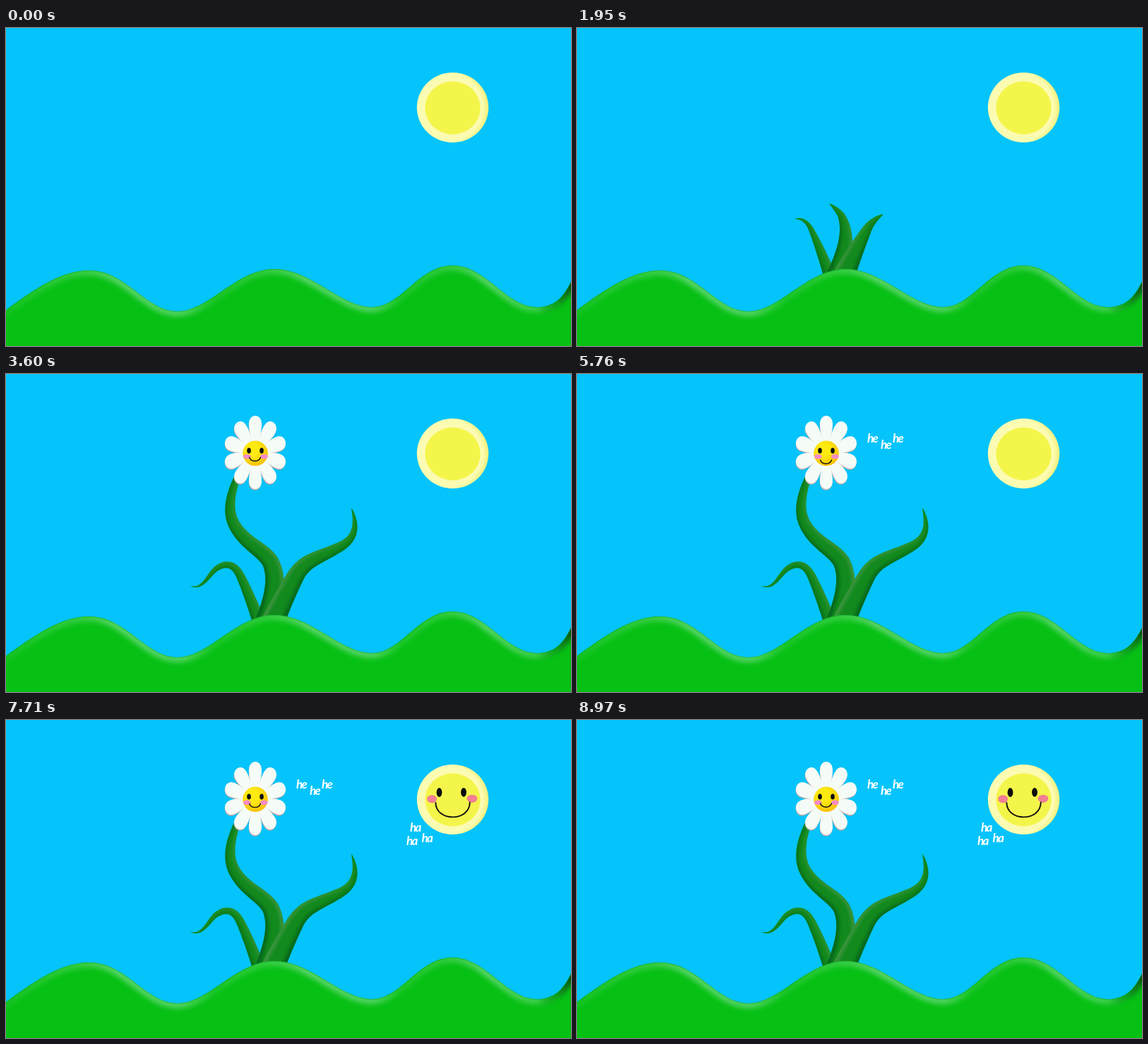
An HTML page for the animation above (9 s loop, 800 by 450 pixels).

```html
<!DOCTYPE html>
<html lang="en">
<head>
<meta charset="utf-8">
<title>Laughing flower and sun</title>
<style>
  html, body { margin: 0; width: 100%; height: 100%; overflow: hidden; background: #04c4fb; }
  svg { display: block; width: 800px; height: 450px; }
  text { font: italic 700 17px Lato, "Open Sans", sans-serif; letter-spacing: -1.6px; fill: #fff; }
  .mouth { fill: none; stroke: #111; stroke-linecap: round; }
</style>
</head>
<body>
<svg viewBox="0 0 800 450">
  <defs>
    <path id="ridge" d="M-20 413 C28 380 70 343 118 343 C170 343 198 401 243 401 C287 401 326 341 380 341 C432 341 474 395 518 395 C560 395 584 336 632 336 C680 336 708 395 752 395 C777 395 790 380 800 359 L820 318"/>
    <clipPath id="land"><path d="M-20 413 C28 380 70 343 118 343 C170 343 198 401 243 401 C287 401 326 341 380 341 C432 341 474 395 518 395 C560 395 584 336 632 336 C680 336 708 395 752 395 C777 395 790 380 800 359 L820 318 V470 H-20 Z"/></clipPath>
    <linearGradient id="rim" gradientUnits="userSpaceOnUse" x1="0" x2="800" y1="0" y2="0">
      <stop offset="0" stop-color="#46d254" stop-opacity=".2"/>
      <stop offset=".13" stop-color="#46d254" stop-opacity=".7"/>
      <stop offset=".2" stop-color="#52d462"/>
      <stop offset=".31" stop-color="#4cd25c"/>
      <stop offset=".37" stop-color="#46d254" stop-opacity=".3"/>
      <stop offset=".46" stop-color="#46d254" stop-opacity=".65"/>
      <stop offset=".53" stop-color="#52d462"/>
      <stop offset=".65" stop-color="#4cd25c"/>
      <stop offset=".7" stop-color="#46d254" stop-opacity=".3"/>
      <stop offset=".78" stop-color="#46d254" stop-opacity=".65"/>
      <stop offset=".85" stop-color="#52d462"/>
      <stop offset=".94" stop-color="#46d254" stop-opacity=".8"/>
      <stop offset=".97" stop-color="#1c8a2a" stop-opacity=".5"/>
      <stop offset="1" stop-color="#054d10"/>
    </linearGradient>
    <radialGradient id="ring" cx=".43" cy=".5" r=".58">
      <stop offset=".84" stop-color="#fcfbb2"/>
      <stop offset="1" stop-color="#f1ee70"/>
    </radialGradient>
    <radialGradient id="disc" cx=".4" cy=".35" r=".7">
      <stop offset=".35" stop-color="#fdea10"/>
      <stop offset="1" stop-color="#f7bd08"/>
    </radialGradient>
    <filter id="soft" x="-20%" y="-20%" width="140%" height="140%"><feGaussianBlur stdDeviation="3.2"/></filter>
    <filter id="fine" x="-50%" y="-50%" width="200%" height="200%"><feGaussianBlur stdDeviation="2.4"/></filter>
    <g id="petals"></g>
  </defs>

  <rect width="800" height="450" fill="#04c4fb"/>

  <ellipse cx="632.5" cy="112.5" rx="50.7" ry="49.5" fill="url(#ring)"/>
  <ellipse cx="632.5" cy="113" rx="39.2" ry="37.4" fill="#f4f54a"/>
  <g id="sunFace">
    <ellipse cx="613.5" cy="102.5" rx="3.9" ry="6.4" fill="#0b0b0b"/>
    <ellipse cx="648" cy="102.3" rx="3.9" ry="6.4" fill="#0b0b0b"/>
    <ellipse cx="603" cy="111.8" rx="7" ry="5.6" fill="#f27f93"/>
    <ellipse cx="660" cy="111.3" rx="7.4" ry="5.6" fill="#f27f93"/>
    <path id="sunMouth" class="mouth" stroke-width="1.9" d="M608.3 117 C608.8 144.3 656.2 144.3 656.8 116.5"/>
  </g>

  <g id="plant"></g>

  <g clip-path="url(#land)">
    <rect y="300" width="800" height="150" fill="#07c014"/>
    <use href="#ridge" fill="none" stroke="url(#rim)" stroke-width="15" filter="url(#soft)"/>
    <use href="#ridge" fill="none" stroke="#0a8f2c" stroke-opacity=".35" stroke-width="2"/>
  </g>

  <g id="flower">
    <use href="#petals" x="-.4" y="1.4" fill="#c3a9a9"/>
    <use href="#petals" fill="#f5fbf6"/>
    <circle cy="1.3" r="17.8" fill="url(#disc)"/>
  </g>
  <g id="flowerFace">
    <ellipse cx="344" cy="108.6" rx="2.8" ry="4" fill="#0b0b0b"/>
    <ellipse cx="362" cy="108.6" rx="2.8" ry="4" fill="#0b0b0b"/>
    <ellipse cx="341.3" cy="116.8" rx="5.4" ry="3.4" fill="#f68bc6"/>
    <ellipse cx="365.3" cy="116.8" rx="5.4" ry="3.4" fill="#f68bc6"/>
    <path id="flowerMouth" class="mouth" stroke-width="1.4" d="M344.6 118 C347 125 358 125 360.4 118"/>
  </g>

  <g id="he">
    <text x="411" y="97">he</text>
    <text x="430" y="106">he</text>
    <text x="447" y="96.5">he</text>
  </g>
  <g id="ha">
    <text x="572" y="157.5">ha</text>
    <text x="567" y="176.5">ha</text>
    <text x="588.5" y="173">ha</text>
  </g>
</svg>

<script>
const LOOP = 9000, STEP = 30;
const GROW = 1230, BLOOM = 3060, BLOOM_TIME = 270, SMILE = 3600;
const GIGGLE = 4830, SUN_SMILE = 6060, SUN_LAUGH = 7290;
const SPEED = 0.147;   // px of stem per ms
const TAPER = 0.72;

const $ = id => document.getElementById(id);

function make(tag, attrs, parent) {
  const el = document.createElementNS("http://www.w3.org/2000/svg", tag);
  for (const key in attrs) el.setAttribute(key, attrs[key]);
  if (parent) parent.append(el);
  return el;
}

for (let i = 0; i < 10; i++) {
  make("path", {
    d: "M-3.5 -8 C-7 -22 -10.8 -31 -10.4 -41 C-10 -48.5 -5 -52 0 -52 C5 -52 10 -48.5 10.4 -41 C10.8 -31 7 -22 3.5 -8 Z",
    transform: `scale(.86 1) rotate(${i * 36})`
  }, $("petals"));
}

// lit: side of the stem that catches the light (1 = right of its direction)
const stems = [
  { d: "M360 356 C351 330 339 300 331 284 C322 267 309 267 297 276 C285 286 279 306 261 300", width: 18.5, start: 0, lit: 1 },
  { d: "M366 358 C378 325 387 291 374 265 C362 247 336 239 322 211 C310 186 322 148 350 104", width: 32, start: 14, lit: 1 },
  { d: "M373 362 C384 335 399 306 410 286 C423 263 446 259 466 248 C490 238 501 222 489 189", width: 34, start: 12, lit: -1 }
].map((stem, i) => {
  const line = make("path", { d: stem.d });
  const clip = make("clipPath", { id: "stem" + i }, $("plant"));
  const outline = make("path", {}, clip);
  const body = make("path", { fill: "#128a1d" }, $("plant"));
  const shade = make("g", { "clip-path": `url(#stem${i})` }, $("plant"));
  const dark = make("path", { fill: "#04581a", "fill-opacity": .75, filter: "url(#fine)" }, shade);
  const light = make("path", { fill: "#5a9c58", "fill-opacity": .7, filter: "url(#fine)" }, shade);
  return { ...stem, line, length: line.getTotalLength(), outline, body, dark, light };
});

// Outline between two offsets, measured in half widths from the centre line
function ribbon(spine, from, to) {
  const edge = k => spine.map(p =>
    (p.x + p.nx * p.half * k).toFixed(2) + " " + (p.y + p.ny * p.half * k).toFixed(2));
  return "M" + edge(from).concat(edge(to).reverse()).join("L") + "Z";
}

function drawStem(stem, time) {
  const grown = time < GROW ? 0 : Math.min(stem.length, stem.start + SPEED * (time - GROW));
  if (grown === stem.grown) return;
  stem.grown = grown;
  const parts = [stem.outline, stem.body, stem.dark, stem.light];
  if (grown < 2) {
    parts.forEach(p => p.setAttribute("d", ""));
    return;
  }
  const spine = [], count = 48;
  for (let i = 0; i <= count; i++) {
    const u = i / count, s = grown * u;
    const p = stem.line.getPointAtLength(s);
    const a = stem.line.getPointAtLength(Math.max(0, s - 1));
    const b = stem.line.getPointAtLength(Math.min(stem.length, s + 1));
    const len = Math.hypot(b.x - a.x, b.y - a.y) || 1;
    spine.push({
      x: p.x, y: p.y,
      nx: (a.y - b.y) / len, ny: (b.x - a.x) / len,
      half: stem.width / 2 * Math.pow(1 - u, TAPER)
    });
  }
  const full = ribbon(spine, -1, 1), lit = stem.lit;
  const shapes = [full, full, ribbon(spine, -lit * 1.2, -lit * 0.65), ribbon(spine, lit * 0.7, lit * 1.1)];
  parts.forEach((p, i) => p.setAttribute("d", shapes[i]));
}

const show = (id, on) => { $(id).style.display = on ? "" : "none"; };

function bounce(id, since, period, height) {
  const y = since < 0 ? 0 : height * (1 - Math.cos(2 * Math.PI * since / period)) / 2;
  $(id).setAttribute("transform", `translate(0 ${y.toFixed(2)})`);
}

function draw(time) {
  stems.forEach(stem => drawStem(stem, time));

  const bloom = Math.max(0, Math.min(1, (time - BLOOM) / BLOOM_TIME));
  show("flower", bloom > 0);
  $("flower").setAttribute("transform", `translate(353 111) scale(${bloom})`);

  show("flowerFace", time >= SMILE);
  show("he", time >= GIGGLE);
  show("sunFace", time >= SUN_SMILE);
  show("ha", time >= SUN_LAUGH);
  bounce("flowerMouth", time - GIGGLE, 588, 4);
  bounce("sunMouth", time - SUN_LAUGH, 420, 7.5);
}

const begin = performance.now();
function tick() {
  const time = (performance.now() - begin) % LOOP;
  draw(Math.floor(time / STEP) * STEP);
  requestAnimationFrame(tick);
}
tick();
</script>
</body>
</html>
```
